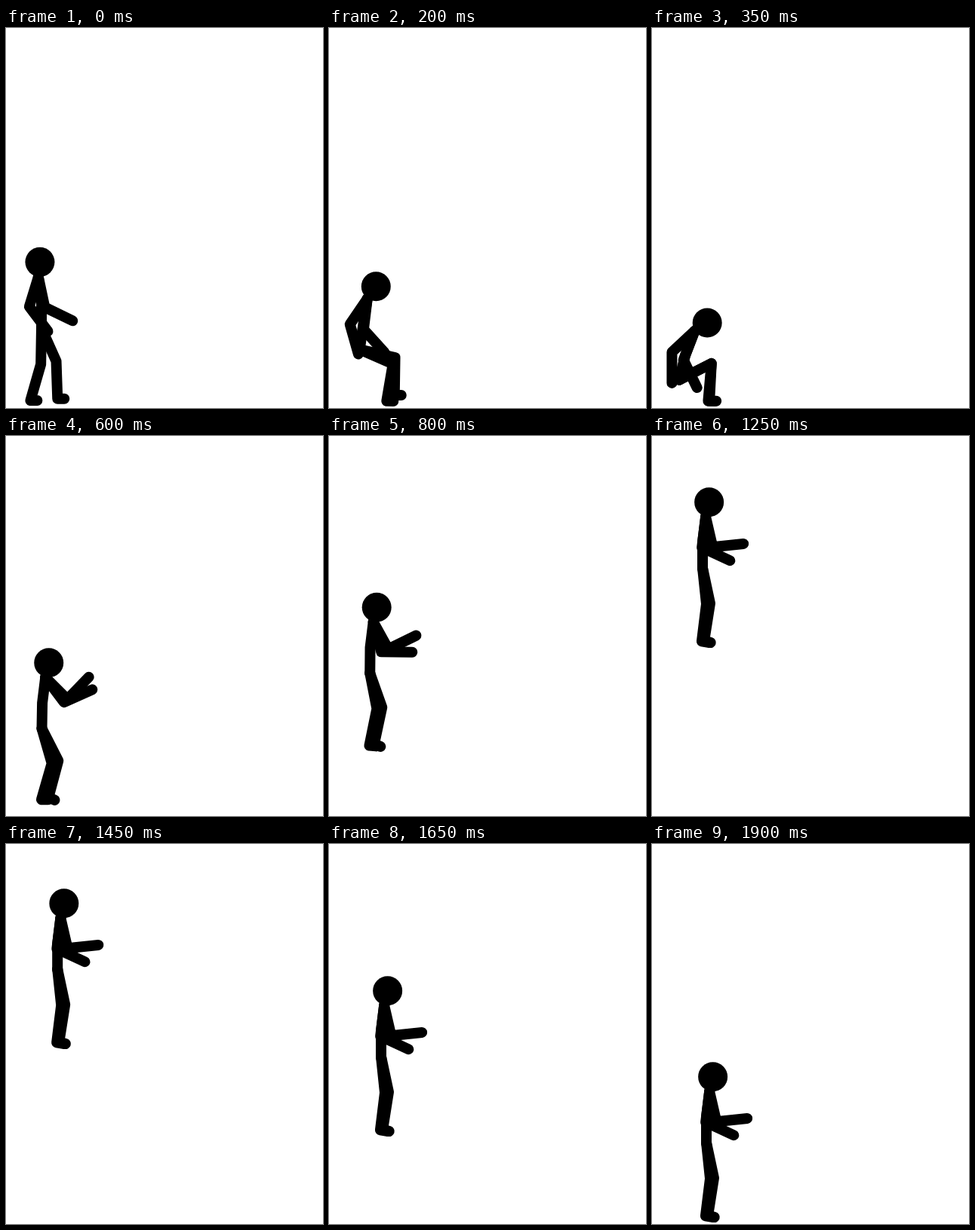
An HTML page with a canvas for the animation above (1.95 s loop, 420 px wide and 504 px high).

```html
<!DOCTYPE html>
<html lang="en">
<head>
<meta charset="utf-8">
<title>Jumping stick figure</title>
<style>
html, body { margin: 0; width: 100%; height: 100%; overflow: hidden; background: #fff; }
canvas { display: block; }
</style>
</head>
<body>
<canvas id="stage" width="420" height="504"></canvas>
<script>
const ctx = document.getElementById('stage').getContext('2d');
const LOOP = 1950, TICK = 50, GROUND = 495;
const HELD = [550, 650, 1000, 1100, 1400]; // ticks that repeat the previous drawing

// Bone lengths from the joint outwards
const SPINE = [34, 34, 20], ARM = [41, 41], LEG = [48, 50, 9];

// Bone angles in degrees: 0 points down, 90 right, 180 up
const stand = {
  hip: [47, 398], spine: [180, 187, 174],
  arms: [[-17, 37], [12, 64]], legs: [[-1, -16, 90], [24, 2, 90]]
};
const crouch = {
  hip: [36, 467], spine: [166, 159, 123],
  arms: [[-47, 0], [-21, 26]], legs: [[117, -5, 88], [117, -3, 90]]
};
const launch = {
  hip: [47.5, 388], spine: [179, 173, 167],
  arms: [[37, 114], [45, 136]], legs: [[16, -16, 90], [27, -15, 65]]
};
const glide = {
  hip: [72, 396], spine: [180, 173, 167],
  arms: [[-7, 65], [13, 96]], legs: [[6, -7, 80], [12, -9, 73]]
};

// Drawing index, pose, shift of the hip
const keys = [
  [0, stand, 0, 0], [7, crouch, 0, 0], [8, crouch, -4, 0],
  [10, launch, -3, 9], [11, launch, 0, 0],
  [17, glide, -11, -155], [18, glide, -10, -177], [21, glide, -5, -221],
  [23, glide, -4, -259], [28, glide, -3, -114], [33, glide, 0, 0]
];

// Blends numbers, or every part of nested poses
function mix(a, b, k) {
  if (typeof a === 'number') return a + (b - a) * k;
  const out = Array.isArray(a) ? [] : {};
  for (const part in a) out[part] = mix(a[part], b[part], k);
  return out;
}

function poseAt(step) {
  const next = Math.max(1, keys.findIndex(k => k[0] >= step));
  const [from, a, ax, ay] = keys[next - 1], [to, b, bx, by] = keys[next];
  const k = (step - from) / (to - from);
  const pose = mix(a, b, k);
  pose.hip[0] += mix(ax, bx, k);
  pose.hip[1] += mix(ay, by, k);
  return pose;
}

function chain(start, angles, lengths) {
  const points = [start];
  angles.forEach((deg, i) => {
    const [x, y] = points[i], a = deg * Math.PI / 180;
    points.push([x + lengths[i] * Math.sin(a), y + lengths[i] * Math.cos(a)]);
  });
  return points;
}

function draw({ hip, spine, arms, legs }) {
  const back = chain(hip, spine, SPINE);
  const [, , shoulder, head] = back;
  const legLines = legs.map(angles => chain(hip, angles, LEG));
  const armLines = arms.map(angles => chain(shoulder, angles, ARM));
  const lowest = Math.max(...legLines.flat().map(p => p[1]));

  ctx.fillStyle = '#fff';
  ctx.fillRect(0, 0, 420, 504);
  ctx.save();
  ctx.translate(0, Math.min(0, GROUND - lowest)); // keep the feet above ground
  ctx.fillStyle = ctx.strokeStyle = '#000';
  ctx.lineWidth = 14;
  ctx.lineCap = ctx.lineJoin = 'round';
  for (const line of [back, ...armLines, ...legLines]) {
    ctx.beginPath();
    line.forEach(p => ctx.lineTo(...p));
    ctx.stroke();
  }
  ctx.beginPath();
  ctx.arc(...head, 19.5, 0, 2 * Math.PI);
  ctx.fill();
  ctx.restore();
}

const start = performance.now();
function frame() {
  const t = (performance.now() - start) % LOOP;
  draw(poseAt(Math.floor(t / TICK) - HELD.filter(h => h <= t).length));
  requestAnimationFrame(frame);
}
frame();
</script>
</body>
</html>
```
